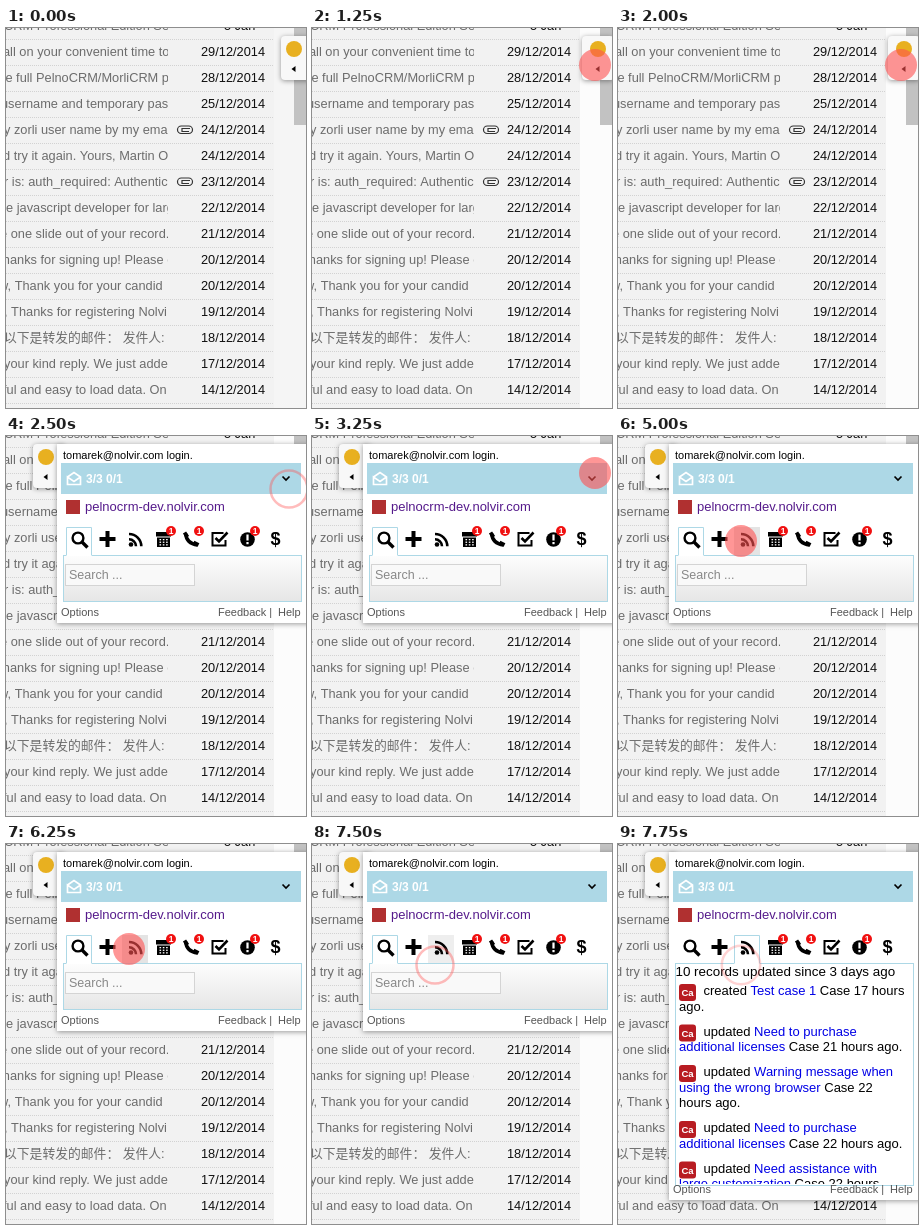
Recreate the animation shown at these times as an HTML page with a canvas. Size 300 px wide and 380 px high, loop 8 s.

```html
<!DOCTYPE html>
<html lang="en">
<head>
<meta charset="utf-8">
<title>Mail side panel</title>
<style>
html, body { margin: 0; width: 100%; height: 100%; overflow: hidden; background: #f2f2f2; }
canvas { display: block; width: 300px; height: 380px; }
</style>
</head>
<body>
<canvas id="stage" width="300" height="380"></canvas>
<script>
const ctx = document.getElementById('stage').getContext('2d');
const LOOP = 8000, STEP = 250;
const NUDGE = 1250, OPEN = 2500, HOVER = 4750, CLICK = 7500, FEED = 7750;
const SANS = '"Liberation Sans", Arial, "Noto Sans CJK SC", "Noto Sans CJK", sans-serif';
const BLUE = '#add8e6', LINK = '#0000e6', INK = '#000';
const ROW = 26, TAB = 28;

// visible subject, how far it is cut at the left, day of December
const mails = [
  ['CRM Professional Edition Se', 2],
  ['all on your convenient time to', 3, 29],
  ['ve full PelnoCRM/MorliCRM pro', 7, 28],
  ['username and temporary pass', 5, 25],
  ['y zorli user name by my email', 2, 24],
  ['d try it again. Yours, Martin O', 3, 24],
  ['r is: auth_required: Authentica', 2, 23],
  ['e javascript developer for large', 0, 22],
  ['e one slide out of your record.', 6, 21],
  ['Thanks for signing up! Please c', 11, 20],
  ['w, Thank you for your candid', 7, 20],
  [', Thanks for registering Nolvi', 2, 19],
  ['以下是转发的邮件： 发件人:', 2, 18],
  ['your kind reply. We just adde', 2, 17],
  ['ful and easy to load data. On', 3, 14]
];

// each entry: verb, then lines of [linked part, plain part]
const feed = [
  ['created', ['Test case 1', ' Case 17 hours'], ['', 'ago.']],
  ['updated', ['Need to purchase', ''], ['additional licenses', ' Case 21 hours ago.']],
  ['updated', ['Warning message when', ''], ['using the wrong browser', ' Case 22'], ['', 'hours ago.']],
  ['updated', ['Need to purchase', ''], ['additional licenses', ' Case 22 hours ago.']],
  ['updated', ['Need assistance with', ''], ['large customization', ' Case 22 hours']]
];

// pointer stops: time, x, y
const stops = [
  [500, 274, -10], [750, 273, 35], [NUDGE, 283, 37], [4000, 122, 85],
  [4250, 71, 94], [HOVER, 118, 105], [5000, 123, 105]
];
// ripples: begin, end
const clicks = [[1500, 2000], [OPEN, 3250], [CLICK, LOOP]];

function rect(x, y, w, h, fill) {
  ctx.fillStyle = fill;
  ctx.fillRect(x, y, w, h);
}

function frame(x, y, w, h, color) {
  ctx.strokeStyle = color;
  ctx.lineWidth = 1;
  ctx.strokeRect(x + .5, y + .5, w - 1, h - 1);
}

function text(str, x, y, size, fill, weight = '') {
  ctx.font = `${weight} ${size}px ${SANS}`;
  ctx.fillStyle = fill;
  ctx.fillText(str, x, y);
  return x + ctx.measureText(str).width;
}

function dot(x, y, r, fill) {
  ctx.fillStyle = fill;
  ctx.beginPath();
  ctx.arc(x, y, r, 0, Math.PI * 2);
  ctx.fill();
}

function arc(x, y, r, width, color, from = 0, to = Math.PI * 2) {
  ctx.beginPath();
  ctx.arc(x, y, r, from, to);
  ctx.lineWidth = width;
  ctx.strokeStyle = color;
  ctx.stroke();
}

function line(points, width, color = INK) {
  ctx.beginPath();
  points.forEach(([x, y]) => ctx.lineTo(x, y));
  ctx.lineWidth = width;
  ctx.strokeStyle = color;
  ctx.stroke();
}

function rounded(x, y, w, h, r, fill) {
  ctx.beginPath();
  ctx.roundRect(x, y, w, h, r);
  ctx.fillStyle = fill;
  ctx.fill();
}

function clipped(x, y, w, h, draw) {
  ctx.save();
  ctx.beginPath();
  ctx.rect(x, y, w, h);
  ctx.clip();
  draw();
  ctx.restore();
}

function raised(x, y, w, h, r, fill) {
  ctx.save();
  ctx.shadowColor = 'rgba(0,0,0,.4)';
  ctx.shadowBlur = 5;
  ctx.shadowOffsetY = 1;
  rounded(x, y, w, h, r, fill);
  ctx.restore();
}

function paperclip(y) {
  ctx.strokeStyle = '#333';
  ctx.lineWidth = 1.2;
  ctx.beginPath();
  ctx.roundRect(171.5, y - 4, 15, 7.5, 4);
  ctx.moveTo(184, y - 1.5);
  ctx.lineTo(176, y - 1.5);
  ctx.lineTo(176, y + 1.5);
  ctx.lineTo(183, y + 1.5);
  ctx.stroke();
}

function inbox(t) {
  rect(0, 0, 268, 380, '#f2f2f2');
  rect(268, 0, 32, 380, t < NUDGE ? '#f5f5f5' : '#fcfcfc');
  rect(288, 0, 12, 97, '#c2c2c2');
  mails.forEach(([subject, cut, day], i) => {
    const mid = i * ROW - 2;
    clipped(0, mid - ROW / 2, 162, ROW, () => text(subject, -cut, mid + 4, 12.8, '#6c6c6c'));
    if (day) text(day + '/12/2014', 195, mid + 4, 12.8, '#111');
    else text('5 Jan', 218, mid + 4, 12.8, '#111');
    if (i === 4 || i === 6) paperclip(mid);
    ctx.setLineDash([1, 1]);
    line([[0, mid + 13.5], [268, mid + 13.5]], 1, '#d2d2d2');
    ctx.setLineDash([]);
  });
}

function handle(x, cx) {
  raised(x, 8, 32, 44, 4, '#f8f8f8');
  dot(cx, 21, 8, '#e8b020');
  ctx.beginPath();
  ctx.moveTo(cx - 2.5, 41);
  ctx.lineTo(cx + 1.5, 38);
  ctx.lineTo(cx + 1.5, 44);
  ctx.fillStyle = INK;
  ctx.fill();
}

// toolbar icons, each drawn around its own centre
const icons = [
  () => {
    arc(-1.5, -1, 5.4, 2.4, INK);
    line([[2.5, 3], [8, 8.5]], 3.4);
  },
  () => {
    rect(-8, -2, 16, 4, INK);
    rect(-2, -8, 4, 16, INK);
  },
  () => {
    dot(-4.5, 5.5, 2.3, INK);
    [7, 12.3].forEach(r => arc(-6.5, 7.3, r, 2.6, INK, -Math.PI / 2, 0));
  },
  () => {
    rect(-7.5, -7, 15, 4.5, INK);
    rect(-6.5, -1.5, 13, 9.5, INK);
    for (let i = 0; i < 9; i++) rect(-4 + i % 3 * 3.3, Math.floor(i / 3) * 2.6, 1.6, 1.3, '#fff');
  },
  () => {
    ctx.beginPath();
    ctx.moveTo(-6, -5.5);
    ctx.quadraticCurveTo(-5, 4.5, 6, 6);
    ctx.lineWidth = 3.4;
    ctx.stroke();
    line([[-7, -6.5], [-4, -2]], 3.8);
    line([[2, 3.5], [7, 6]], 3.8);
  },
  () => {
    line([[4, -6], [-7, -6], [-7, 6.5], [6, 6.5], [6, 1]], 2);
    line([[-4, -1], [-.5, 2.5], [8, -6.5]], 2.6);
  },
  () => {
    dot(0, .5, 7.3, INK);
    rect(-1.1, -4.5, 2.2, 6, '#fff');
    rect(-1.1, 3, 2.2, 2.2, '#fff');
  },
  () => text('$', -5, 6, 18, INK, 'bold')
];

function toolbar() {
  icons.forEach((icon, i) => {
    ctx.save();
    ctx.translate(73.5 + TAB * i, 103);
    ctx.strokeStyle = INK;
    icon();
    if (i === 3 || i === 4 || i === 6) {
      dot(7.5, -8, 5, '#f01010');
      text('1', 5.2, -5, 8.5, '#fff', 'bold');
    }
    ctx.restore();
  });
}

function tab(i) {
  const x = 60 + TAB * i;
  rect(x, 91, 26, 29, '#fff');
  line([[x + .5, 119.5], [x + .5, 91.5], [x + 25.5, 91.5], [x + 25.5, 119.5]], 1, BLUE);
}

function searchBox() {
  const shade = ctx.createLinearGradient(0, 119, 0, 166);
  shade.addColorStop(0, '#fdfdfd');
  shade.addColorStop(1, '#e6e6e6');
  rect(57, 119, 239, 47, shade);
  frame(57, 119, 239, 47, BLUE);
  rect(59, 128, 130, 22, '#f9f9f9');
  frame(59, 128, 130, 22, '#d4d4d4');
  text('Search ...', 63, 143, 12.5, '#888');
}

function feedList() {
  frame(57, 119, 239, 223, BLUE);
  clipped(58, 120, 237, 220, () => {
    text('10 records updated since 3 days ago', 57.5, 132, 13.4, INK);
    let y = 151;
    feed.forEach(([verb, ...lines]) => {
      rounded(61, y - 11, 17, 17, 3, '#b81c22');
      text('Ca', 63.5, y + 1, 9.5, '#fff', 'bold');
      let x = text(verb + ' ', 85.5, y, 13, INK);
      lines.forEach(([link, plain]) => {
        text(plain, text(link, x, y, 13, LINK), y, 13, INK);
        x = 61;
        y += 15.5;
      });
      y += 9.5;
    });
  });
}

function panel(t) {
  const feedOpen = t >= FEED;
  const bottom = feedOpen ? 356 : 187;
  handle(27, 40);
  raised(51, 8, 255, bottom - 8, 0, '#fff');
  text('tomarek@nolvir.com login.', 57, 23, 11, INK);

  rect(55, 27, 240, 31, BLUE);
  line([[61.5, 41], [68, 36.5], [74.5, 41], [74.5, 48.5], [61.5, 48.5], [61.5, 41], [68, 45.5], [74.5, 41]], 1.7, '#fff');
  text('3/3 0/1', 80, 47, 12, '#fff', 'bold');
  line([[276.5, 40.5], [280, 44], [283.5, 40.5]], 1.7);

  rect(60, 64, 14, 14, '#b03030');
  text('pelnocrm-dev.nolvir.com', 79, 75, 13, '#551a8b');

  if (feedOpen) {
    feedList();
    tab(2);
  } else {
    searchBox();
    tab(0);
    if (t >= HOVER) rect(60 + TAB * 2, 91, 26, 28, t < CLICK ? '#e4e4e4' : '#eee');
  }
  toolbar();
  text('Options', 55, bottom - 7, 11, '#555');
  text('Feedback |', 212, bottom - 7, 11, '#555');
  text('Help', 272, bottom - 7, 11, '#555');
}

function pointer(t) {
  const stop = stops.filter(s => s[0] <= t).pop();
  if (!stop) return;
  const [, x, y] = stop;
  const click = clicks.find(([from, to]) => t >= from && t < to);
  if (!click) return dot(x, y, 16, 'rgba(255,80,80,.6)');
  const age = Math.floor((t - click[0]) / STEP);
  arc(x, y + 16, 18.5 + age * .7, 2.5, `rgba(255,80,80,${.38 - age * .13})`);
}

function draw(t) {
  inbox(t);
  if (t >= OPEN) panel(t);
  else if (t >= NUDGE) handle(270, 286);
  else handle(275, 288);
  pointer(t);
}

const start = performance.now();
function tick() {
  draw((performance.now() - start) % LOOP);
  requestAnimationFrame(tick);
}
tick();
</script>
</body>
</html>
```
